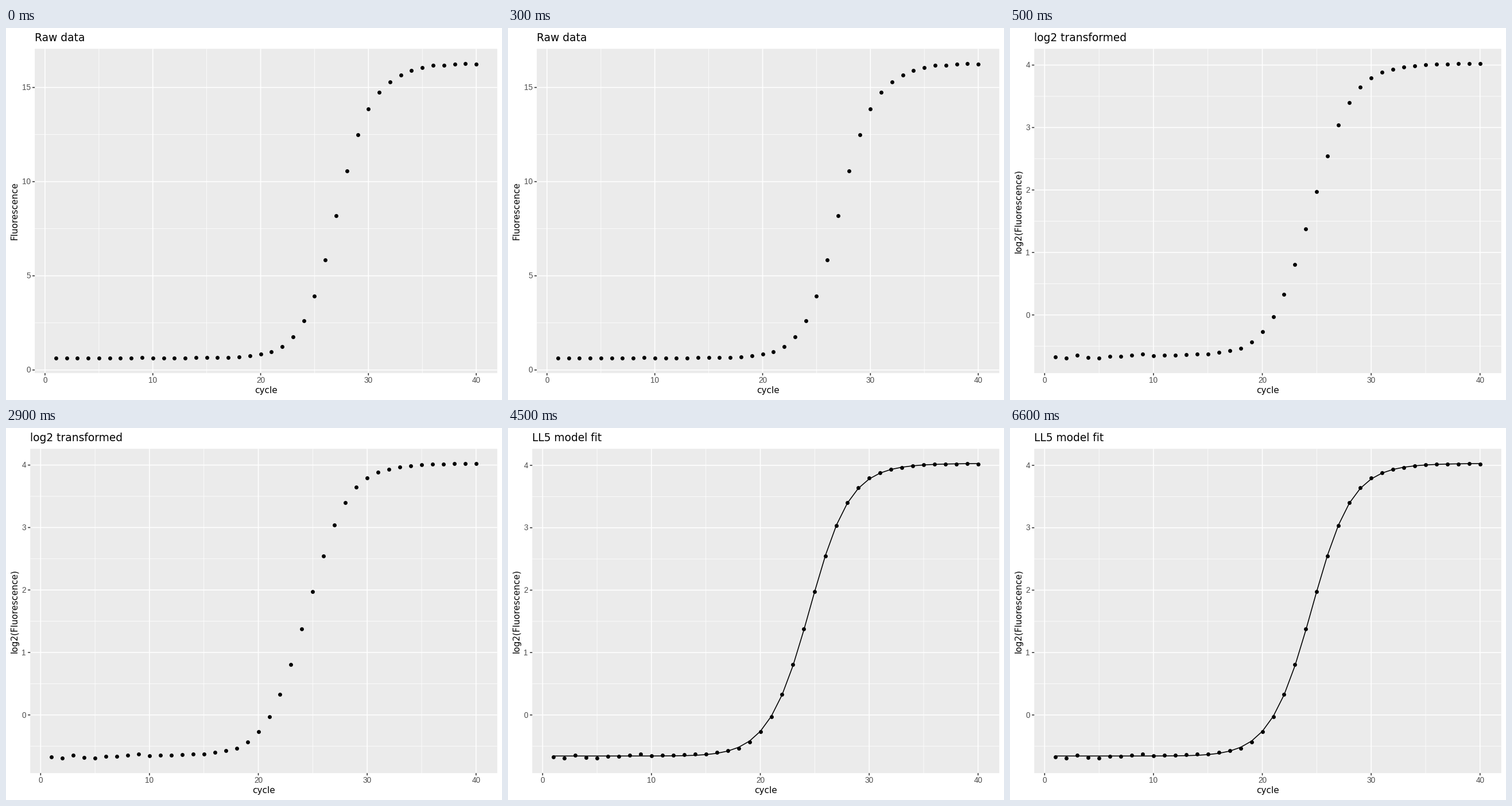
Write a matplotlib script that moves like this. It is 864 px wide and 648 px high and loops after 8 s.

```python
import numpy as np
import matplotlib.pyplot as plt
from matplotlib.animation import FuncAnimation
from matplotlib.patches import Rectangle

W, H, DPI = 864, 648, 108
TOP, BOTTOM, RIGHT = 36.3, 601.1, 855.75
PT = 72 / DPI                 # points per pixel
MAJOR, MINOR = 1.6, 0.8       # line widths in pixels
DOT = 6.9

cycle = np.arange(1, 41)
log_fluo = np.array([
    -.677, -.687, -.648, -.686, -.695, -.666, -.663, -.643, -.626, -.655,
    -.644, -.642, -.634, -.623, -.623, -.595, -.575, -.538, -.434, -.267,
    -.032, .326, .804, 1.380, 1.977, 2.543, 3.036, 3.403, 3.644, 3.794,
    3.882, 3.936, 3.968, 3.990, 4.005, 4.0145, 4.017, 4.021, 4.024, 4.022])


def ll5(p):
    """Five-parameter log-logistic curve at every cycle."""
    low, high, slope, mid, skew = p
    return low + (high - low) * (1 + (mid / cycle) ** slope) ** -skew


def fit_ll5(y, p, steps=60, damp=1e-3):
    """Damped least squares with a numeric Jacobian."""
    p = np.array(p, float)
    for _ in range(steps):
        res = y - ll5(p)
        jac = np.empty((len(y), len(p)))
        for i in range(len(p)):
            q = p.copy()
            h = 1e-5 * abs(p[i])
            q[i] += h
            jac[:, i] = (ll5(q) - ll5(p)) / h
        normal = jac.T @ jac
        move = np.linalg.solve(normal + damp * np.diag(np.diag(normal)),
                               jac.T @ res)
        if np.sum((y - ll5(p + move)) ** 2) < np.sum(res ** 2):
            p, damp = p + move, damp / 3
        else:
            damp *= 4
    return p


curve = ll5(fit_ll5(log_fluo, [-.658, 4.03, 15.7, 25.63, .635]))

fig = plt.figure(figsize=(W / DPI, H / DPI), dpi=DPI, facecolor="white")
ax = fig.add_axes([0, 0, 1, 1])
ax.set(xlim=(0, W), ylim=(H, 0))
ax.axis("off")


def make_scene(title, ylabel, left, y, majors, minors, line=None):
    """Draw one chart and return its artists."""
    parts = []
    spread = y if line is None else np.concatenate([y, line])
    lo, hi = spread.min(), spread.max()
    pad = (hi - lo) * 0.05
    lo, hi = lo - pad, hi + pad

    def px(v):
        return left + (v + 0.95) / 42.9 * (RIGHT - left)

    def py(v):
        return BOTTOM - (v - lo) / (hi - lo) * (BOTTOM - TOP)

    def stroke(xs, ys, color, width, z):
        parts.extend(ax.plot(xs, ys, color=color, lw=width * PT, zorder=z,
                             solid_capstyle="butt", snap=False))

    def label(x, y, s, size, color="black", font="DejaVu Sans", **kw):
        parts.append(ax.text(x, y, s, fontsize=size * PT, color=color,
                             family=font, va="baseline", **kw))

    def tick_label(x, y, v, ha):
        label(x, y, str(v), 13.6, "#4d4d4d", "Liberation Sans", ha=ha)

    parts.append(ax.add_patch(Rectangle(
        (left, TOP), RIGHT - left, BOTTOM - TOP, fc="#ebebeb", lw=0,
        snap=False, zorder=0)))

    for ys, xs, width in ((minors, (5, 15, 25, 35), MINOR),
                          (majors, range(0, 41, 10), MAJOR)):
        for v in ys:
            stroke([left, RIGHT], [py(v)] * 2, "white", width, 1)
        for v in xs:
            stroke([px(v)] * 2, [TOP, BOTTOM], "white", width, 1)

    for v in majors:
        stroke([left - 4.1, left], [py(v)] * 2, "#333333", MAJOR, 2)
        tick_label(left - 7.4, py(v) + 4.7, v, "right")
    for v in range(0, 41, 10):
        stroke([px(v)] * 2, [BOTTOM, BOTTOM + 4.1], "#333333", MAJOR, 2)
        tick_label(px(v), 617.6, v, "center")

    parts.extend(ax.plot(px(cycle), py(y), "o", color="black", ms=DOT * PT,
                         mew=0, snap=False, zorder=3))
    if line is not None:
        stroke(px(cycle), py(line), "black", MAJOR, 4)

    label(left, 22.6, title, 18.7, ha="left")
    label((left + RIGHT) / 2, 636.2, "cycle", 15.2, ha="center")
    label(20, (TOP + BOTTOM) / 2, ylabel, 15.2, ha="center", rotation=90,
          rotation_mode="anchor")
    return parts


log_axis = dict(ylabel="log2(Fluorescence)", left=42.3, y=log_fluo,
                majors=range(5), minors=np.arange(-0.5, 4))
scenes = [
    make_scene("Raw data", "Fluorescence", 50.1, 2 ** log_fluo,
               (0, 5, 10, 15), (2.5, 7.5, 12.5)),
    make_scene("log2 transformed", **log_axis),
    make_scene("LL5 model fit", line=curve, **log_axis),
]

STEP = 500
STARTS = (0, 500, 4500)


def update(frame):
    now = frame * STEP
    current = sum(now >= t for t in STARTS) - 1
    for i, parts in enumerate(scenes):
        for part in parts:
            part.set_visible(i == current)
    return []


anim = FuncAnimation(fig, update, frames=8000 // STEP, interval=STEP,
                     init_func=lambda: update(0), repeat=True, repeat_delay=0)
plt.show()
```
